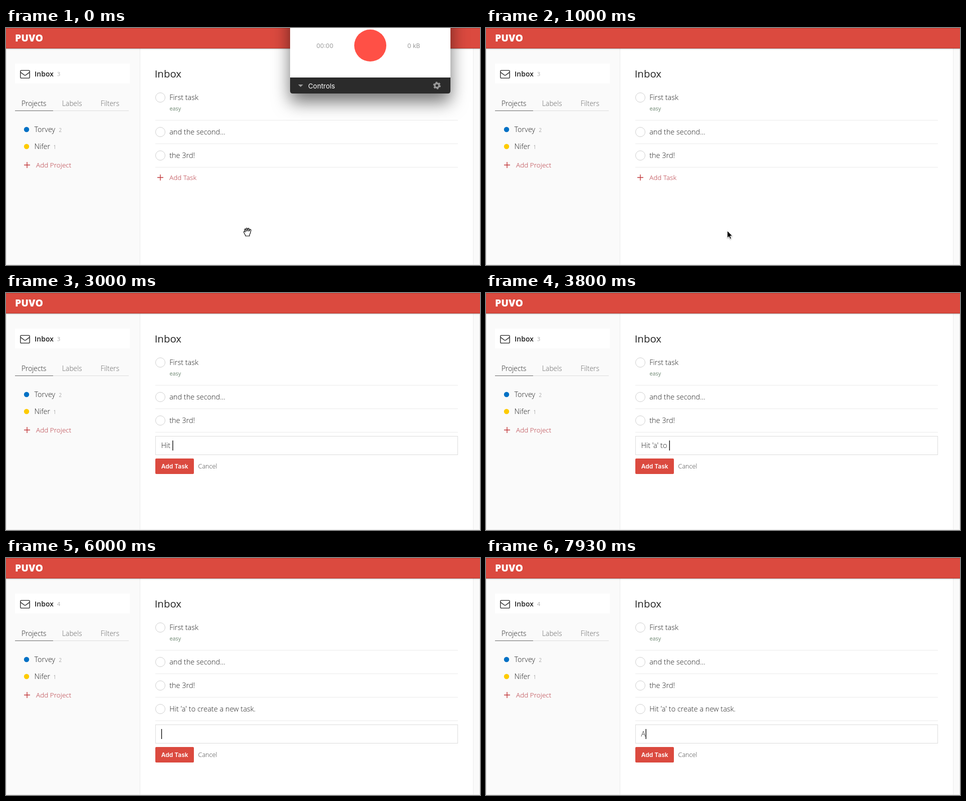
These frames come from a looping animation (946 px wide and 474 px high, 8 s). An HTML page:

```html
<!DOCTYPE html>
<html lang="en">
<head>
<meta charset="utf-8">
<title>Task list</title>
<style>
  html, body { margin: 0; width: 100%; height: 100%; overflow: hidden; background: #fff; }
  svg { display: block; width: 100%; height: 100%; }
  text { font: 300 14.5px "Open Sans", sans-serif; fill: #202020; white-space: pre; }
  .brand { font-size: 19.5px; font-weight: 800; fill: #fff; }
  .title { font-size: 20.4px; font-weight: 400; }
  .selected { font-size: 14px; font-weight: 600; }
  .count { font-size: 11px; font-weight: 400; fill: #aaa; }
  .tab { font-size: 13.8px; fill: #666; }
  .active { fill: #222; }
  .label { font-size: 10.8px; font-weight: 400; fill: #6a846e; }
  .add { font-size: 13.6px; fill: #b5323a; }
  .cancel { font-size: 12.7px; fill: #444; }
  .button { font: 600 12px Inter, sans-serif; fill: #fff; }
  .recorder text { font: 400 12px Inter, sans-serif; fill: #999; }
  .recorder .bar { font-size: 13.5px; fill: #fff; }
  .recorder { filter: drop-shadow(0 17px 17px rgba(0, 0, 0, .55)); }
  .header { filter: drop-shadow(0 1px 1px rgba(0, 0, 0, .25)); }
  .arrow { filter: drop-shadow(0 1px 1px rgba(0, 0, 0, .35)); }
  .rule { stroke: #ebebeb; }
  .plus { stroke: #c23a3c; stroke-width: 1.4; }
</style>
</head>
<body>
<svg viewBox="0 0 946 474" preserveAspectRatio="none">
  <defs>
    <path id="plus" class="plus" d="M-6 0H6M0-6V6"/>
    <g id="row">
      <circle cx="308" r="9.5" fill="#fff" stroke="#d0d0d0"/>
    </g>
  </defs>

  <rect width="946" height="474" fill="#fff"/>
  <rect width="267" height="474" fill="#fafafa"/>
  <rect x="932" width="14" height="474" fill="#fafafa"/>
  <path class="rule" d="M267.5 41V474M932.5 41V474"/>
  <rect x=".5" y=".5" width="945" height="473" rx="2" fill="none" stroke="#e3e3e3"/>

  <g class="header">
    <rect width="946" height="41" fill="#db4a3f"/>
    <path d="M0 .5H946" stroke="#c5392f"/>
    <path d="M0 40.5H946" stroke="#b03a30"/>
  </g>
  <text class="brand" x="18" y="27.3">PUVO</text>

  <rect x="18" y="71" width="229" height="40" fill="#fff"/>
  <g fill="none" stroke="#444" stroke-width="1.6" stroke-linejoin="round">
    <rect x="28.8" y="84.8" width="18.4" height="15.4" rx="2"/>
    <path d="M29 88.5L36.5 94.2Q38 95.2 39.5 94.2L47 88.5"/>
  </g>
  <text class="selected" x="57" y="97">Inbox</text>
  <text class="count" id="count" x="102" y="96">3</text>

  <text class="tab active" x="31" y="156">Projects</text>
  <text class="tab" x="112" y="156">Labels</text>
  <text class="tab" x="189" y="156">Filters</text>
  <path d="M18 165.5H245" stroke="#ddd"/>
  <path d="M18 165.5H94" stroke="#666"/>

  <circle cx="41" cy="203" r="5.2" fill="#0071c5"/>
  <text x="56.5" y="208">Torvey</text>
  <text class="count" x="105.5" y="207.5" style="font-size:10px">2</text>
  <circle cx="41" cy="237" r="5.2" fill="#fdcb00"/>
  <text x="56.5" y="242">Nifer</text>
  <text class="count" x="94.5" y="241.5" style="font-size:10px">1</text>
  <use href="#plus" x="42" y="274"/>
  <text class="add" x="60" y="279">Add Project</text>

  <text class="title" x="296.7" y="99">Inbox</text>
  <use href="#row" y="139"/>
  <text x="326.2" y="144">First task</text>
  <text class="label" x="326.5" y="165">easy</text>
  <use href="#row" y="208"/>
  <text x="326.2" y="213">and the second...</text>
  <use href="#row" y="255"/>
  <text x="326.2" y="260">the 3rd!</text>
  <path class="rule" d="M298 184.5H902M298 231.5H902M298 278.5H902"/>

  <g id="newRow">
    <use href="#row" y="302"/>
    <text id="newTask" x="326.2" y="307"></text>
    <path class="rule" d="M298 325.5H902"/>
  </g>

  <g id="addLink">
    <use href="#plus" x="308" y="299"/>
    <text class="add" x="326" y="304">Add Task</text>
  </g>

  <g id="form">
    <rect x="298.5" y="286.5" width="603" height="37" fill="#fff" stroke="#dcdcdc"/>
    <text id="input" x="309.5" y="310"></text>
    <rect id="caret" y="295" width="1.3" height="20" fill="#000"/>
    <rect x="298" y="331" width="77" height="31" rx="2" fill="#db4a3f"/>
    <text class="button" x="309.7" y="351">Add Task</text>
    <text class="cancel" x="383.5" y="351">Cancel</text>
  </g>

  <g class="recorder" id="recorder">
    <path d="M567-60H887V126Q887 131 882 131H572Q567 131 567 126Z" fill="#fff"/>
    <path d="M567 99H887V126Q887 131 882 131H572Q567 131 567 126Z" fill="#2b2b2b"/>
    <circle cx="727" cy="35" r="32" fill="#ff5046"/>
    <text x="619.5" y="40">00:00</text>
    <text x="801" y="40">0 kB</text>
    <path d="M583 113H593L588 118Z" fill="#999"/>
    <text class="bar" x="603" y="121">Controls</text>
    <g fill="none" stroke="#999">
      <circle cx="860" cy="115" r="4.3" stroke-width="3.4"/>
      <circle cx="860" cy="115" r="6.4" stroke-width="2.4" stroke-dasharray="3.35 3.35"/>
    </g>
  </g>

  <path id="hand" transform="translate(482 408)" fill="#fff" stroke="#000" stroke-width="1.2" stroke-linejoin="round"
    d="M-4 8C-4 5-7 3-7.5 0C-7.5-2-5.5-2-4.5 0L-6-4.5C-6-6.5-4-6.8-3.4-5L-2.4-1.5L-2.8-6.5C-2.6-8.5-.5-8.5-.3-6.5L0-1.8L1-6.5C1.5-8.3 3.4-7.8 3.2-6L2.8-1.5L4.6-4.5C5.6-6 7.4-5 6.8-3.2C6 0 6 3 4 5.5V8Z"/>
  <path id="arrow" class="arrow" transform="translate(481.5 405.5)" fill="#000" stroke="#fff"
    d="M0 0V14.5L3.4 11.4L5.7 16.6L8.1 15.6L5.9 10.5H10.3Z"/>
</svg>
<script>
  const LOOP = 8000, OPEN = 1480, TYPE = 2550, KEY = 115, ENTER = 5890, NEXT = 7890;
  const BLINK = 500, FORM_SHIFT = 47;
  const sentence = "Hit 'a' to create a new task.";
  const el = id => document.getElementById(id);
  const show = (id, on) => { el(id).style.display = on ? "" : "none"; };

  function typedAt(t) {
    if (t >= NEXT) return "A";
    if (t < TYPE || t >= ENTER) return "";
    return sentence.slice(0, 1 + Math.floor((t - TYPE) / KEY));
  }

  // The blink restarts after every action, so the caret stays lit while typing.
  function caretVisible(t) {
    const typing = (t >= TYPE && t < ENTER) || t >= NEXT;
    return typing || Math.floor((t - (t < ENTER ? OPEN : ENTER)) / BLINK) % 2 === 0;
  }

  function draw(t) {
    const added = t >= ENTER, open = t >= OPEN;

    const fade = Math.min(1, Math.max(0, 1 - (t - 70) / 200));
    el("recorder").style.opacity = fade;
    show("recorder", fade > 0);
    show("hand", t < 70);
    show("arrow", t >= 70 && !open);

    show("addLink", !open);
    show("form", open);
    show("newRow", added);
    el("count").textContent = added ? 4 : 3;
    el("form").setAttribute("transform", `translate(0 ${added ? FORM_SHIFT : 0})`);

    const typed = typedAt(t), input = el("input");
    input.textContent = typed;
    const width = open && typed ? input.getComputedTextLength() : 0;
    el("caret").setAttribute("x", 309.9 + width);
    show("caret", caretVisible(t));
  }

  el("newTask").textContent = sentence;
  const start = performance.now();
  function tick() {
    draw((performance.now() - start) % LOOP);
    requestAnimationFrame(tick);
  }
  tick();
</script>
</body>
</html>
```
